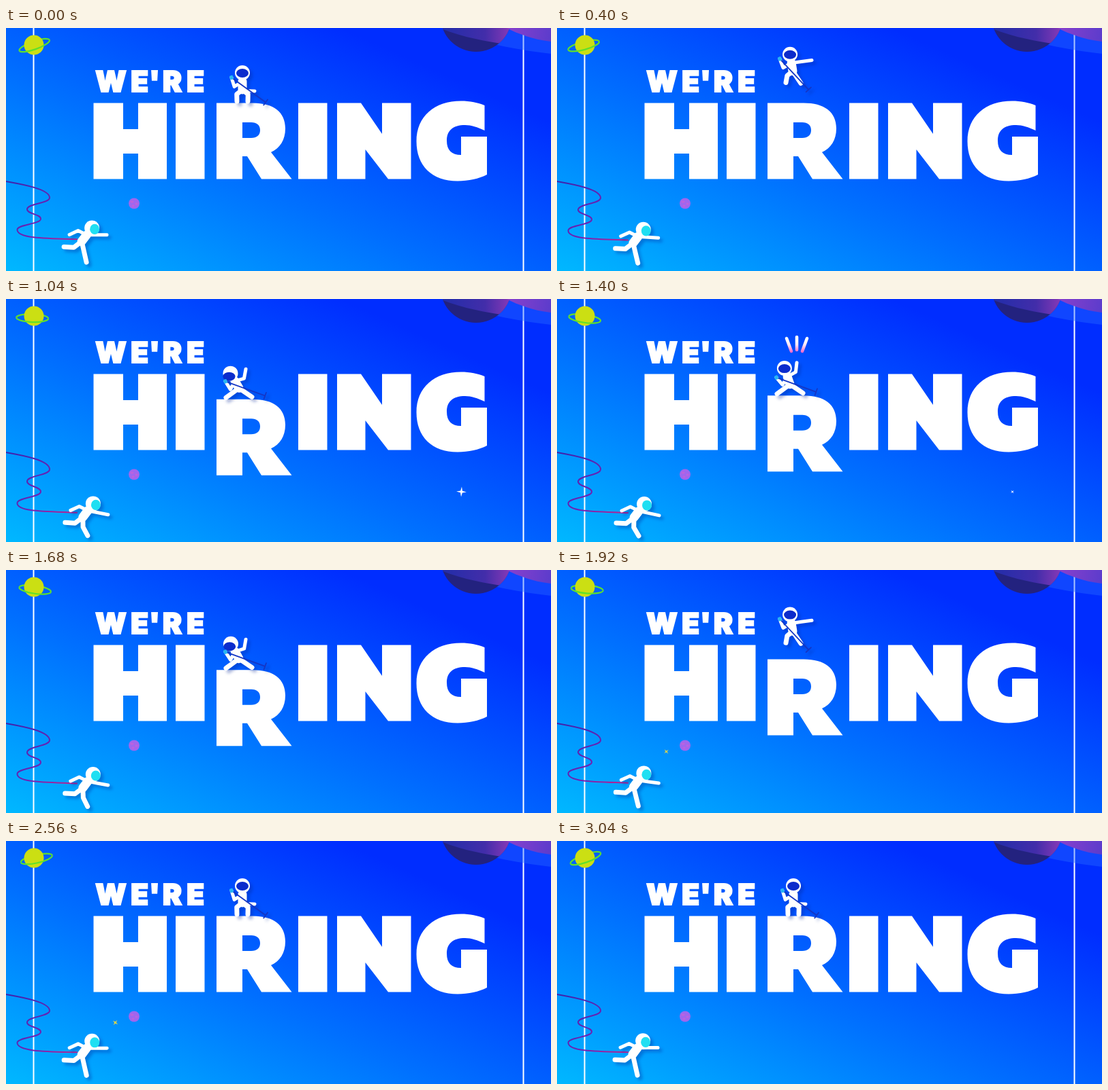
An HTML page that plays this animation: 800x358 px, repeating every 3080 ms.

```html
<!DOCTYPE html>
<html lang="en">
<head>
<meta charset="utf-8">
<title>We're hiring</title>
<style>
  html, body { margin: 0; width: 100%; height: 100%; overflow: hidden; background: #0064ff; }
  svg { display: block; width: 800px; height: 358px; }
  text { font: 900 42px Inter, Lato, sans-serif; text-anchor: middle; stroke: #fff; stroke-width: 2.2; }
  .figure { filter: drop-shadow(4px 4px 2px rgba(0, 35, 150, .34)); }
  .figure path, #rays path, #rope { fill: none; stroke-linecap: round; stroke-linejoin: round; }
  .figure path { stroke: #fff; }
</style>
</head>
<body>
<svg viewBox="0 0 800 358">
  <defs>
    <linearGradient id="sky" gradientUnits="userSpaceOnUse" x1="0" y1="358" x2="217" y2="-124">
      <stop stop-color="#00b8ff"/><stop offset=".5" stop-color="#0070ff"/><stop offset="1" stop-color="#002dff"/>
    </linearGradient>
    <linearGradient id="haze" gradientUnits="userSpaceOnUse" x1="645" y1="0" x2="742" y2="0">
      <stop stop-color="#2430b4"/><stop offset=".6" stop-color="#4a30b4"/><stop offset="1" stop-color="#a53fc6"/>
    </linearGradient>
    <linearGradient id="wedge" gradientUnits="userSpaceOnUse" x1="735" y1="0" x2="800" y2="12">
      <stop stop-color="#8a40cc"/><stop offset="1" stop-color="#5c3ccc"/>
    </linearGradient>
    <linearGradient id="cord" gradientUnits="userSpaceOnUse" x1="0" y1="226" x2="100" y2="312">
      <stop stop-color="#3c22ac"/><stop offset=".6" stop-color="#7022b4"/><stop offset="1" stop-color="#bc2290"/>
    </linearGradient>
    <linearGradient id="flare" gradientUnits="userSpaceOnUse" x1="0" y1="60" x2="0" y2="79">
      <stop stop-color="#fff"/><stop offset=".4" stop-color="#ffe6f6"/><stop offset="1" stop-color="#f05fc8"/>
    </linearGradient>
    <clipPath id="globe"><circle cx="690" cy="-17" r="52"/></clipPath>
  </defs>

  <rect width="800" height="358" fill="url(#sky)"/>
  <path d="M40.5 0V358M759.5 10V358" stroke="#fff" stroke-width="2"/>
  <path d="M640 0C690 20 740 31 800 38V0Z" fill="#2a6cff" opacity=".4"/>
  <circle cx="690" cy="-17" r="52" fill="#23227f"/>
  <path d="M636 0C670 14 705 20 745 26V0Z" fill="url(#haze)" opacity=".8" clip-path="url(#globe)"/>
  <path d="M735 0H800V20C775 17 752 9 735 0Z" fill="url(#wedge)"/>

  <g fill="none" stroke="#5fe02c" stroke-width="2.2">
    <path class="ring" d="M-23.5 0A23.5 6 0 0 1 23.5 0"/>
    <circle cx="41" cy="25" r="14.5" fill="#cbdf13" stroke="none"/>
    <path class="ring" d="M-23.5 0A23.5 6 0 0 0 23.5 0"/>
  </g>

  <circle cx="188" cy="258.5" r="8" fill="#a066ee"/>
  <path d="M184 256h2M191 259h1M186 262h1" stroke="#bd62dd" stroke-width="3" stroke-linecap="round"/>

  <path id="rope" stroke="url(#cord)" stroke-width="2"/>
  <g id="stars"></g>
  <g id="small" fill="#fff"></g>
  <g id="big" fill="#fff" role="img" aria-label="HIRING"></g>
  <g id="rays" stroke="url(#flare)" stroke-width="4.6"></g>
  <g class="figure" id="hero"></g>
  <g class="figure" id="runner"></g>
</svg>

<script>
const LOOP = 3080, STEP = 40;
const $ = id => document.getElementById(id);
const mix = (a, b, u) => a + (b - a) * u;
const part = (t, from, to) => Math.max(0, Math.min(1, (t - from) / (to - from)));
const ramp = (t, from, to) => (1 - Math.cos(Math.PI * part(t, from, to))) / 2;
const arc = u => 4 * u * (1 - u);

function set(el, attrs) {
  for (const name in attrs) el.setAttribute(name, attrs[name]);
}
function add(parent, tag, attrs = {}) {
  const el = document.createElementNS('http://www.w3.org/2000/svg', tag);
  set(el, attrs);
  return parent.appendChild(el);
}

// Lettering: outline or glyph, centre, tilt while hopping
const letters = [
  ['M128.5 110.5H172V149H194V110.5H236V222.5H194V185H172V222.5H128.5Z', 182, -1.6],
  ['M249 110.5H291.5V222.5H249Z', 270, -1],
  ['M309 110.5H362C393 110.5 410 124 410 148C410 165 402 177 389 183L419.5 222.5H375L354 189H347V222.5H309Z' +
   'M347 139V162H360C368 162 373 158 373 150.5C373 143 368 139 360 139Z', 364, 0],
  ['M429 110.5H471.5V222.5H429Z', 450, -1],
  ['M486 110.5H521L552 156V110.5H594.5V222.5H561L527.5 179V222.5H486Z', 540, 1.2],
  ['M702.5 114V151C692 146 683 143 674 143C656 143 647 151 647 166C647 180 654 187 668 187V160H706V216' +
   'C694 222 679 225.5 663 225.5C625 225.5 602.5 203 602.5 167C602.5 130 629 107.5 668 107.5C681 107.5 693 110 702.5 114Z', 655, -2.6],
  ['W', 154, 0], ['E', 196, 0], ["'", 218, 0], ['R', 244, 0], ['E', 278, -4]
].map(([shape, x, tilt]) => {
  if (shape.length > 1)
    return { x, y: 166, tilt, el: add($('big'), 'path', { d: shape, 'fill-rule': 'evenodd' }) };
  const el = add($('small'), 'text', { x, y: 94 });
  el.textContent = shape;
  return { x, y: 79, tilt, el };
});
const pressed = letters[2].el;

// The pressed letter bobs with each cheer
const bob = t => Math.cos(2 * Math.PI * (t - 680) / 720);
const sink = t => (34.5 - 2.8 * bob(t)) * (ramp(t, 540, 600) - ramp(t, 1720, 2180));

// Offsets of hands and feet are measured from the hip
const stand = { x: 347, drop: 0, lean: 0, pole: 36, hands: [-16, -18, 18, 2], feet: [-8, 17, 8, 17] };
const cheer = { x: 342, drop: 3, lean: -19, pole: 20, hands: [-20, -10, 10, -32], feet: [-19, 14, 19, 13] };
const fly = { x: 346, drop: 0, lean: -9, pole: 47, hands: [-19, -18, 28, -16], feet: [-10, 17, 12, 18] };
const stages = [stand, fly, cheer, fly, stand, stand];

function blend(a, b, u) {
  const out = {};
  for (const key in a)
    out[key] = Array.isArray(a[key]) ? a[key].map((v, i) => mix(v, b[key][i], u)) : mix(a[key], b[key], u);
  return out;
}

function heroPose(t) {
  const stage = ramp(t, 220, 360) + ramp(t, 440, 560) + ramp(t, 1680, 1840) + ramp(t, 2300, 2450);
  const i = Math.floor(stage);
  const pose = blend(stages[i], stages[i + 1], stage - i);
  const duck = (1 - bob(t)) / 2 * (ramp(t, 440, 560) - ramp(t, 1680, 1840));
  const fall = part(t, 1700, 2440);
  const ground = fall ? mix(128, 91, fall) : 91 + sink(t);
  pose.y = ground + pose.drop - 28 * arc(part(t, 220, 540)) - 32 * arc(fall);
  pose.lean -= 11 * duck;
  pose.hands[3] += 4 * duck;
  pose.visor = [-2 * duck, .5 + 4 * duck];
  return pose;
}

const runnerPose = k => ({
  x: 111 + 2 * k, y: 314 + 8 * k, lean: 37, visor: [4, 2],
  hands: [-18, -10, 37, -10 + 7 * k], feet: [-26, 8, 7, 31 - 4 * k]
});

// Two equal bones from a to b, bent to the given side
function limb([ax, ay], [bx, by], bone, side) {
  const dx = bx - ax, dy = by - ay, d = Math.hypot(dx, dy);
  const bulge = side * Math.sqrt(Math.max(0, bone * bone - d * d / 4)) / d;
  return `M${ax} ${ay}L${(ax + bx) / 2 - dy * bulge} ${(ay + by) / 2 + dx * bulge}L${bx} ${by}`;
}

function makeFigure(root, leg, armSide, legSide, visor) {
  const line = w => add(root, 'path', { 'stroke-width': w });
  return {
    leg, armSide, legSide, legs: line(7), arms: line(5), body: line(13),
    head: add(root, 'circle', { r: 11, fill: '#fff' }), visor: add(root, 'ellipse', visor)
  };
}

function drawFigure(fig, { x, y, lean, hands, feet, visor }) {
  const angle = lean * Math.PI / 180;
  const up = d => [x + d * Math.sin(angle), y - d * Math.cos(angle)];
  const [hx, hy] = up(25), neck = up(12);
  const pair = (from, to, bone, side) =>
    limb(from, [x + to[0], y + to[1]], bone, side) + limb(from, [x + to[2], y + to[3]], bone, -side);
  set(fig.legs, { d: pair([x, y], feet, fig.leg, fig.legSide) });
  set(fig.arms, { d: pair(neck, hands, 14, fig.armSide) });
  set(fig.body, { d: `M${neck}L${x} ${y}` });
  set(fig.head, { cx: hx, cy: hy });
  set(fig.visor, { cx: hx + visor[0], cy: hy + visor[1] });
}

const hero = makeFigure($('hero'), 10.5, -1, 1, { rx: 9, ry: 6.5, fill: '#0c2ccc' });
const pole = add($('hero'), 'path', { d: 'M0 0H62M62 -5V5', 'stroke-width': 1.8, style: 'stroke:#1536c4' });
const grip = add($('hero'), 'rect', { x: -2.5, y: -3, width: 5, height: 6, rx: 1, fill: '#27b4f2' });
const runner = makeFigure($('runner'), 14.5, 1, -1, { rx: 7, ry: 7.6, fill: '#1fdff2' });

// The rope turns back at four points, then runs to the runner
function ropePath(k) {
  let x = 64, y = 250 + k;
  let d = `M0 226C22 230 ${x} 237 ${x} ${y}`;
  [[31, 267], [51, 281], [16.5, 297]].forEach(([nx, ny], i) => {
    ny += k * (i + 2);
    const mid = (y + ny) / 2;
    d += `C${x} ${mid} ${nx} ${mid} ${nx} ${ny}`;
    [x, y] = [nx, ny];
  });
  return d + `C${x} ${y + 13} 60 ${310 + 3 * k} 104 ${311 + 4 * k}`;
}

const rays = [-1, 0, 1].map(side => ({ side, el: add($('rays'), 'path') }));

function drawRays(t) {
  const age = t - (t < 1200 ? 660 : 1280);
  const lead = part(age, 0, 120), tail = part(age, 150, 300);
  set($('rays'), { opacity: age <= 0 ? 0 : mix(.15, 1, lead) * (1 - tail) });
  for (const { side, el } of rays) {
    const point = u => `${352 + side * mix(8, 15, u)} ${mix(75, 56, u) + 2 * Math.abs(side)}`;
    set(el, { d: `M${point(tail)}L${point(Math.max(lead, tail + .01))}` });
  }
}

const stars = [[668.5, 284, 480, '#fff'], [160.5, 267.5, 1720, '#f6d93c']].map(([x, y, start, fill]) => ({
  x, y, start, el: add($('stars'), 'path', { fill, d: 'M0 -7.5L1.4 -1.4L7.5 0L1.4 1.4L0 7.5L-1.4 1.4L-7.5 0L-1.4 -1.4Z' })
}));

function drawStar({ el, x, y, start }, t) {
  const u = part(t, start, start + 1060);
  set(el, { transform: `translate(${x} ${y}) rotate(${130 * (u - .5)}) scale(${Math.sin(Math.PI * u)})` });
}

function render(t) {
  const turn = 2 * Math.PI * t / LOOP;

  const hop = Math.sin(Math.PI * part(t, 540, 840));
  for (const { el, x, y, tilt } of letters)
    set(el, { transform: `translate(0 ${tilt ? -6.5 * hop : 0}) rotate(${tilt * hop} ${x} ${y})` });
  set(pressed, { transform: `translate(0 ${sink(t)})` });

  const pose = heroPose(t);
  const hand = `translate(${pose.x + pose.hands[0]} ${pose.y + pose.hands[1]})`;
  drawFigure(hero, pose);
  set(pole, { transform: `${hand} rotate(${pose.pole})` });
  set(grip, { transform: `${hand} rotate(-20)` });

  const drift = (1 - Math.cos(turn + .45)) / 2;
  drawFigure(runner, runnerPose(drift));
  set($('rope'), { d: ropePath(drift) });

  const place = `translate(${41.7 - 3.6 * Math.sin(turn)} ${27.2 - 1.7 * Math.cos(turn)})`;
  for (const el of document.querySelectorAll('.ring'))
    set(el, { transform: `${place} rotate(${-5.5 - 14 * Math.cos(turn)})` });

  drawRays(t);
  for (const star of stars) drawStar(star, t);
}

const start = performance.now();
function tick() {
  const t = (performance.now() - start) % LOOP;
  render(Math.floor(t / STEP) * STEP);
  requestAnimationFrame(tick);
}
tick();
</script>
</body>
</html>
```
